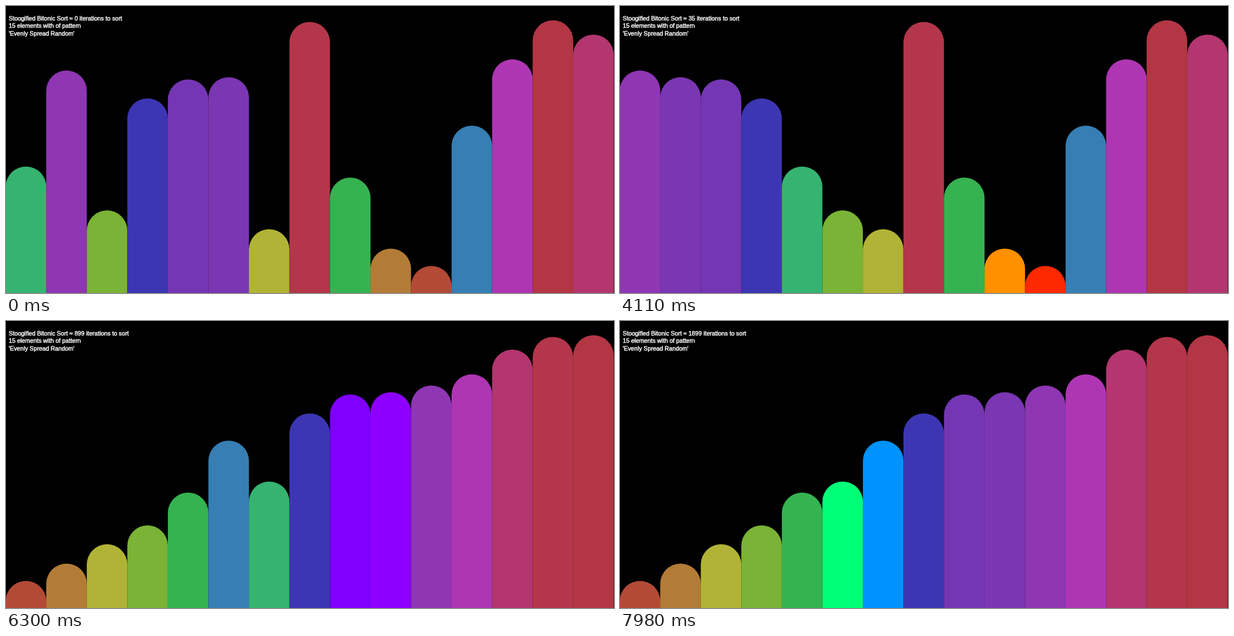
Write an HTML page with a canvas that moves like this. It is 1089 by 514 pixels and loops after 8 s.

```html
<!DOCTYPE html>
<html lang="en">
<head>
<meta charset="utf-8">
<title>Stoogified Bitonic Sort</title>
<style>
  html, body { margin: 0; width: 100%; height: 100%; overflow: hidden; background: #000; }
  canvas { display: block; }
</style>
</head>
<body>
<canvas id="stage" width="1089" height="514"></canvas>
<script>
const ctx = document.getElementById('stage').getContext('2d');
const { width, height } = ctx.canvas;
const LOOP = 8000, TICK = 30, HOLD = 174;
const BAR = width / 15, RADIUS = BAR / 2;

// Each bar is a round-capped line of this length
const bars = [190.3, 362.3, 111.7, 312.3, 346.3, 350.3, 77.9, 449.1, 170.4, 43.3, 12.3, 263.5, 382.3, 452.1, 426.5];

// Every iteration keeps the bars before it acts and the two marked places;
// only the comparisons hold the picture while the sort runs slowly
const steps = [], holds = [0];
const mark = (i, j) => steps.push({ bars: [...bars], i, j });

function compare(i, j, up) {
  holds.push(steps.length);
  mark(i, j);
  if (bars[i] > bars[j] === up) [bars[i], bars[j]] = [bars[j], bars[i]];
}

function merge(lo, n, up) {
  if (n < 2) return;
  let half = 1;
  while (half * 2 < n) half *= 2;
  for (let i = lo; i < lo + n - half; i++) compare(i, i + half, up);
  merge(lo, half, up);
  merge(lo + half, n - half, up);
}

function bitonic(lo, n, up) {
  if (n < 2) return;
  mark(lo, lo + n - 1);
  const half = n >> 1;
  bitonic(lo, half, !up);
  bitonic(lo + half, n - half, up);
  merge(lo, n, up);
}

function stooge(lo, n) {
  bitonic(lo, n, true);
  mark(lo, lo + n - 1);
  if (n < 3) return;
  const third = Math.floor(n / 3);
  stooge(lo, n - third);
  stooge(lo + third, n - third);
  stooge(lo, n - third);
}

mark(-1, -1);
stooge(0, bars.length);

// Fast part: [time in ms, iteration], linear in between
const pace = [[4320, 38], [4710, 60], [5700, 575], [6840, 1190], [7980, 1899]];

function iterationAt(t) {
  if (t < pace[0][0]) return holds[Math.floor((t + HOLD - 90) / HOLD)];
  const k = Math.max(1, pace.findIndex(([end]) => t <= end));
  const [t0, n0] = pace[k - 1], [t1, n1] = pace[k];
  return Math.round(n0 + (n1 - n0) * (t - t0) / (t1 - t0));
}

function drawBar(place, length, marked) {
  const x = place * BAR - 0.5, y = height - length;
  ctx.fillStyle = `hsl(${length * 0.78}, ${marked ? '100%, 50%' : '53.8%, 45.6%'})`;
  ctx.beginPath();
  ctx.moveTo(x, height);
  ctx.arc(x + RADIUS, y, RADIUS, Math.PI, 0);
  ctx.lineTo(x + BAR, height);
  ctx.fill();
}

function drawText(lines) {
  ctx.font = '10.75px "Liberation Sans", Arial, sans-serif';
  ctx.fillStyle = ctx.strokeStyle = '#fff';
  ctx.lineWidth = 0.5;
  lines.forEach((line, k) => {
    ctx.fillText(line, 5, 26 + 13.3 * k);
    ctx.strokeText(line, 5, 26 + 13.3 * k);
  });
}

function draw() {
  const now = performance.now() % LOOP;
  const count = iterationAt(now - now % TICK);
  const { bars, i, j } = steps[count];
  ctx.fillStyle = '#000';
  ctx.fillRect(0, 0, width, height);
  bars.forEach((length, place) => drawBar(place, length, place === i || place === j));
  drawText([
    `Stoogified Bitonic Sort ≈ ${count} iterations to sort`,
    '15 elements with of pattern',
    "'Evenly Spread Random'"
  ]);
  requestAnimationFrame(draw);
}
draw();
</script>
</body>
</html>
```
